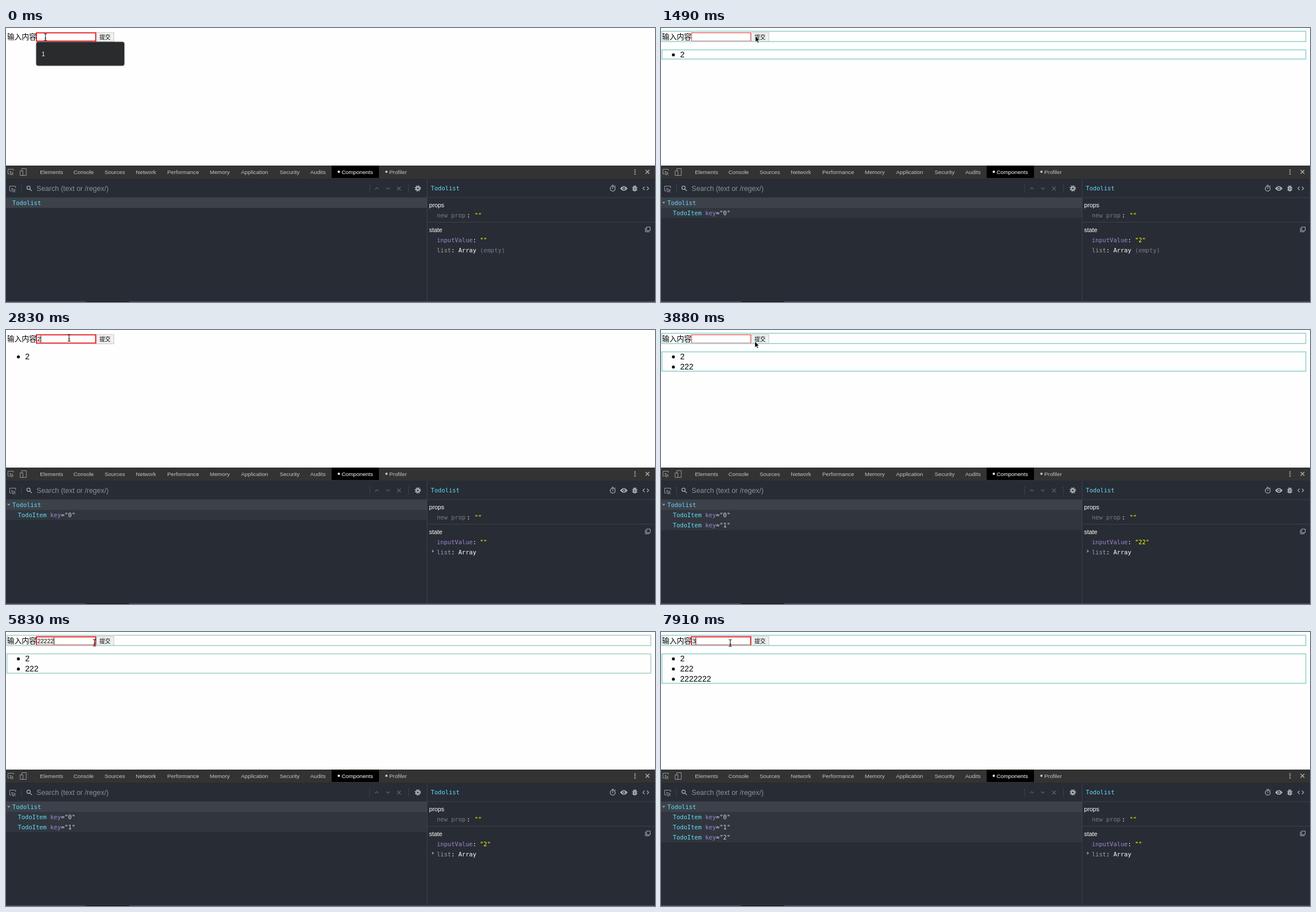
These frames come from a looping animation (1152 by 486 pixels, 8000 ms). An HTML page:

```html
<!DOCTYPE html>
<html lang="zh">
<head>
<meta charset="utf-8">
<title>Todolist</title>
<style>
html, body { margin: 0; width: 100%; height: 100%; overflow: hidden; background: #fff; }
svg { display: block; width: 100%; height: 100%; }
text { white-space: pre; font-family: "Liberation Sans", Arial, sans-serif; }
.cjk { font-family: "Noto Sans CJK SC", "Noto Sans CJK", sans-serif; }
.mono, .mono text { font: 10.6px "DejaVu Sans Mono", monospace; }
.name { fill: #61dafb; }
.attr { fill: #9d87d2; }
.str { fill: #ff0; }
.dim { fill: #777d88; }
.line { fill: none; stroke: #3d424a; }
.icon { fill: none; stroke: #afb3b9; stroke-width: 1.2; }
.off { stroke: #5b606a; }
.soft { stroke: #96999e; stroke-width: 1; }
</style>
</head>
<body>
<svg viewBox="0 0 1152 486" preserveAspectRatio="none">
  <rect width="1152" height="244" fill="#fefefe"/>
  <text class="cjk" x="2" y="19.6" font-size="13">输入内容</text>
  <rect x="160" y="8" width="31.5" height="16.5" fill="#efefef" stroke="#c4c4c4" stroke-width=".9"/>
  <text class="cjk" x="166" y="19.7" font-size="9.8">提交</text>
  <rect id="field" fill="#fff" stroke="#e8262b"/>
  <text id="value" x="55.4" y="19.8" font-size="10.5"></text>
  <path id="caret" stroke="#000" stroke-width="1"/>
  <g id="items"></g>
  <g id="flash" fill="none" stroke-width="1.8">
    <rect x="1.7" y="5.8" width="1142.8" height="18.2"/>
    <rect id="listBox" x="1.7" y="38.7" width="1142.8"/>
  </g>
  <g id="hint">
    <rect x="53.7" y="24.8" width="156.3" height="42" rx="3.5" fill="#2a2b2c" style="filter:drop-shadow(0 .5px 1.2px #0008)"/>
    <text x="63.3" y="49.6" font-size="10.5" fill="#fff">1</text>
  </g>
  <g id="pointer">
    <path id="beam" d="M-2.6 -6Q0 -6 0 -4.5Q0 -6 2.6 -6M0 -5V5M-2.6 6Q0 6 0 4.5Q0 6 2.6 6M-1.4 2H1.4" fill="none" stroke="#111" stroke-width="1.1"/>
    <path id="arrow" d="M0 0V11L2.5 8.7L4.2 12.6L6.1 11.8L4.4 8H7.8Z" stroke="#fff" stroke-width=".8"/>
  </g>

  <rect y="244" width="1152" height="242" fill="#282c34"/>
  <rect y="244" width="1152" height="23" fill="#333"/>
  <rect x="578" y="244" width="84" height="22" fill="#000"/>
  <g id="tabs" font-size="9.85" fill="#c4c4c4"></g>
  <g class="icon">
    <g class="soft">
      <path d="M7 259H3.5V250.5H13V253M7 254L13 257.5L10.5 258.2L9 261ZM10.5 258L13 261"/>
      <path d="M28 253V249.5H36V261.5H30M25 253.5H30V261.5H25Z"/>
      <path d="M10 289H6.5V280.5H17V284M10 284.5L17 287.5L13.8 288.5L12.5 291.5ZM14 288.5L17 291.5"/>
    </g>
    <path d="M1135.3 251.7L1142 258.4M1142 251.7L1135.3 258.4" stroke-width="1.4"/>
    <circle cx="40" cy="283.3" r="3"/><path d="M42.3 285.6L45.8 289"/>
    <path class="off" d="M655 286L658.2 283L661.4 286M674.5 283L677.7 286L680.9 283M694.3 281.5L700.7 288M700.7 281.5L694.3 288"/>
    <circle cx="731" cy="284.5" r="2.7" stroke-width="2.2"/>
    <circle cx="731" cy="284.5" r="4.6" stroke-width="1.8" stroke-dasharray="2 1.613"/>
    <circle cx="1077" cy="285" r="4.4"/><path d="M1075 279H1079M1077 282.5V285.5M1080.5 281L1081.8 279.9"/>
    <path d="M1091 284.5Q1096.7 277.5 1102.4 284.5Q1096.7 291.5 1091 284.5Z" fill="#afb3b9"/>
    <circle cx="1096.7" cy="284.5" r="1.9" fill="#afb3b9" stroke="#282c34"/>
    <rect x="1113.6" y="281" width="5" height="8" rx="2.3" fill="#afb3b9"/>
    <path d="M1111.5 282.5H1120.7M1111.5 285H1120.7M1111.5 287.5H1120.7M1114 279.5L1115.5 281M1118.2 279.5L1116.7 281"/>
    <path d="M1115 283.8H1117.2M1115 286.3H1117.2" stroke="#282c34"/>
    <path d="M1133.5 281.3L1130.5 284.5L1133.5 287.7M1137.7 281.3L1140.7 284.5L1137.7 287.7"/>
    <path d="M1137 353H1143.5V359.5H1137ZM1135 354.5V361.5H1142" stroke-width="1"/>
  </g>
  <path d="M1116.5 250.7V260" stroke="#bbb" stroke-width="2" stroke-dasharray="2 1.6"/>
  <text x="54.3" y="289" font-size="12.5" fill="#8b9099">Search (text or /regex/)</text>
  <g id="tree" class="mono"></g>
  <path class="line" d="M0 301H1152M747.5 267V485M748 344.5H1152M27.5 277V292M645.5 277V292M714.5 277V292"/>
  <text class="mono name" x="754" y="288">Todolist</text>
  <g font-size="10.8" fill="#fff">
    <text x="751" y="318">props</text>
    <text x="751" y="361.5">state</text>
  </g>
  <g class="mono" fill="#fff">
    <text class="dim" x="764.7" y="335.7">new prop</text>
    <text x="817.7" y="335.7">:</text>
    <text class="str" x="831.7" y="335.7">""</text>
    <text x="764.7" y="380"><tspan class="attr">inputValue</tspan>: <tspan class="str" id="state"></tspan></text>
    <text x="764.7" y="397.7"><tspan fill="#9a9da5">list</tspan>: Array<tspan class="dim" id="empty"> (empty)</tspan></text>
  </g>
  <path id="fold" d="M756.3 389.5L759.8 392.2L756.3 395Z" fill="#8f949d"/>
  <rect y="484.6" width="1152" height="1.4" fill="#484b51"/>
  <rect x="142" y="485" width="77" height="1" fill="#08090a"/>
</svg>
<script>
const $ = id => document.getElementById(id);
const LOOP = 8000, ROW = 18;
const TEAL = '#9fd6d2', GREEN = '#b0d8cb';
const todos = ['2', '222', '2222222'];

const tabs = { Elements: 60.3, Console: 119.7, Sources: 175, Network: 230.3, Performance: 286.3, Memory: 361.7,
  Application: 417.2, Security: 485.7, Audits: 540, Components: 595.7, Profiler: 680.3 };
$('tabs').innerHTML = Object.entries(tabs).map(([name, x]) => {
  const ink = name === 'Components' ? ' fill="#fff"' : '';
  const dot = x > 590 ? `<circle cx="${x - 5}" cy="255" r="2.1"${ink}/>` : '';
  return `${dot}<text x="${x}" y="258.7"${ink}>${name}</text>`;
}).join('');

// Each step changes part of the state; at = pointer position.
const start = { at: [70, 16], arrow: false, text: '', caret: false, focus: true, hint: true,
  flash: '', count: 0, state: '', empty: true };
const submit = { text: '', focus: false, caret: false, flash: TEAL };
const click = { arrow: false, focus: true, caret: true, hint: true };
const type = (text, flash = TEAL) => ({ text, flash, caret: true, hint: false });
const steps = [
  [450, { caret: true }],
  [750, type('2')],
  [1050, { flash: '', state: '2' }],
  [1200, { at: [118, 16] }],
  [1340, { at: [167.5, 14], arrow: true }],
  [1490, { ...submit, count: 1 }],
  [1790, { flash: '' }],
  [1930, { at: [148, 15], arrow: false }],
  [2080, { at: [118, 14], state: '', empty: false }],
  [2230, { ...click, at: [112, 14] }],
  [2530, type('2')],
  [2830, { flash: '' }],
  [2980, type('22')],
  [3130, { ...type('222'), state: '22' }],
  [3430, { flash: '', at: [118, 15] }],
  [3580, { at: [146, 18] }],
  [3730, { at: [166.5, 20], arrow: true }],
  [3880, { ...submit, count: 2 }],
  [4030, { state: '' }],
  [4180, { flash: '', at: [150, 20], arrow: false }],
  [4330, { at: [118, 20] }],
  [4480, { ...click, at: [104, 19.5] }],
  [4780, type('2')],
  [5080, { flash: '', state: '2' }],
  [5230, type('22')],
  [5380, type('222')],
  [5680, { ...type('2222', GREEN), at: [128, 20] }],
  [5830, { ...type('22222', GREEN), at: [157, 19] }],
  [5980, { ...type('222222', GREEN), at: [167, 19], arrow: true }],
  [6130, { ...type('2222222', GREEN), state: '222222' }],
  [6280, { flash: GREEN }],
  [6580, { ...submit, count: 3 }],
  [6880, { flash: '' }],
  [7020, { at: [152, 20], arrow: false }],
  [7170, { at: [132, 20], state: '' }],
  [7320, { ...click, at: [123, 19.5] }],
  [7760, type('3')]
];

const show = (id, on) => $(id).setAttribute('visibility', on ? 'visible' : 'hidden');
const set = (id, attrs) => Object.entries(attrs).forEach(([k, v]) => $(id).setAttribute(k, v));

function treeRow(i) {
  const y = 319 + ROW * i;
  return `<rect y="${y}" width="747" height="${ROW}" fill="#31363e"/>` +
    `<text x="21" y="${y + 12.7}"><tspan class="name">TodoItem</tspan> <tspan class="attr">key</tspan>` +
    `<tspan fill="#cedae0">="${i}"</tspan></text>`;
}

function drawLists(count) {
  const done = todos.slice(0, count);
  $('items').innerHTML = done.map((t, i) =>
    `<circle cx="22" cy="${47.7 + ROW * i}" r="2.6"/>` +
    `<text x="34" y="${52.2 + ROW * i}" font-size="14.1">${t}</text>`).join('');
  $('tree').innerHTML = '<rect y="301" width="747" height="18" fill="#3d424a"/>' +
    (count ? '<path d="M2 308.5H7.6L4.8 311.8Z" fill="#9a9ea6"/>' : '') +
    '<text class="name" x="11.3" y="313.7">Todolist</text>' + done.map((_, i) => treeRow(i)).join('');
  set('listBox', { height: Math.max(0, ROW * count - 1.6) });
}

function draw(s) {
  drawLists(s.count);
  set('field', s.focus
    ? { x: 54, y: 8.5, width: 105.2, height: 14.8, 'stroke-width': 2 }
    : { x: 54.2, y: 8.5, width: 105, height: 14.6, 'stroke-width': 1 });
  $('value').textContent = s.text;
  const x = 55.6 + s.text.length * 5.84 + (s.text ? .4 : 0);
  set('caret', { d: `M${x} 10V22` });
  show('caret', s.caret);
  show('hint', s.hint);
  show('flash', s.flash);
  set('flash', { stroke: s.flash || 'none' });
  set('pointer', { transform: `translate(${s.at})` });
  show('beam', !s.arrow);
  show('arrow', s.arrow);
  $('state').textContent = `"${s.state}"`;
  $('empty').textContent = s.empty ? ' (empty)' : '';
  show('fold', !s.empty);
}

let shown = -1;
function frame() {
  const t = performance.now() % LOOP;
  const done = steps.filter(([at]) => at <= t);
  if (done.length !== shown) {
    shown = done.length;
    draw(Object.assign({}, start, ...done.map(step => step[1])));
  }
  requestAnimationFrame(frame);
}
frame();
</script>
</body>
</html>
```
